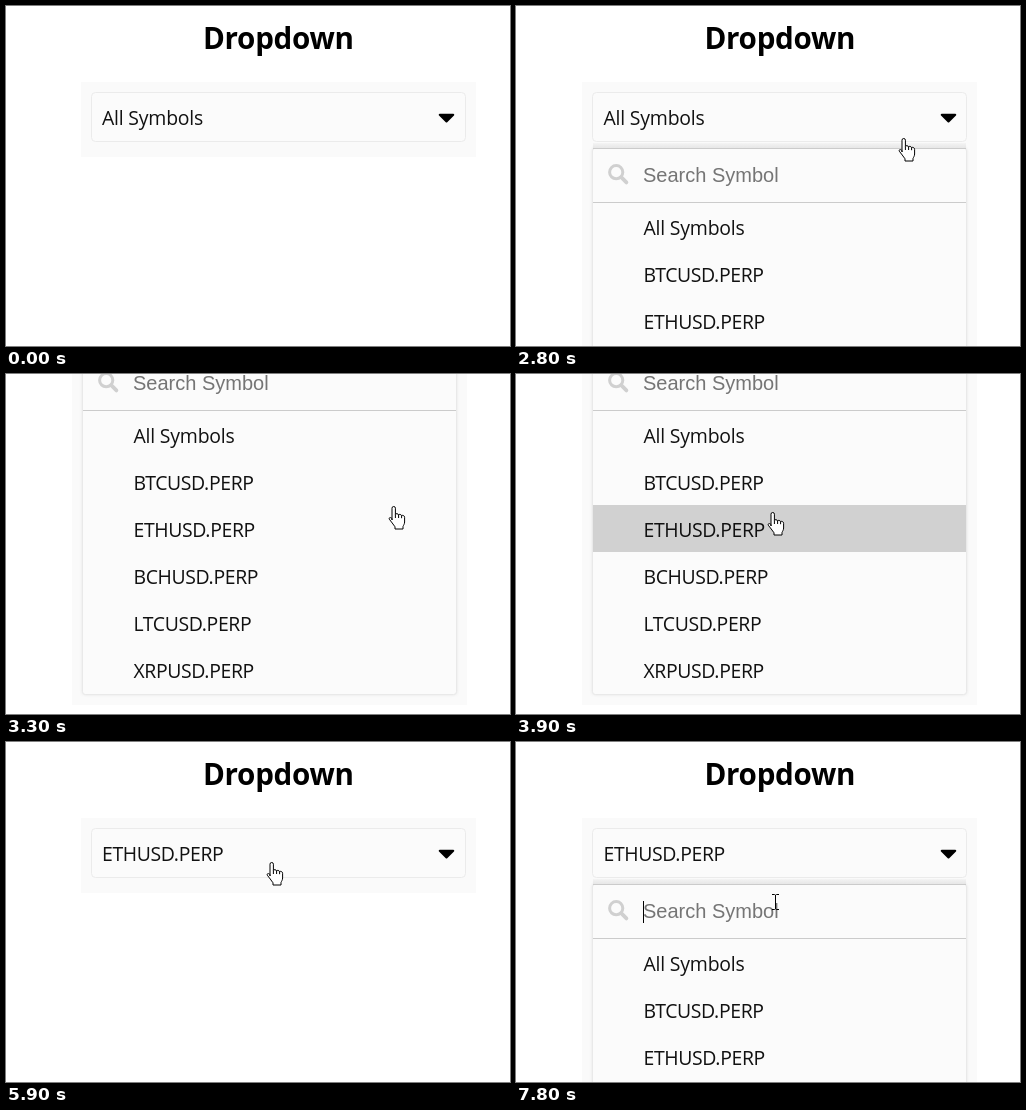
Write an HTML page that moves like this. It is 504 by 340 pixels and loops after 8 s.

```html
<!DOCTYPE html>
<html lang="en">
<head>
<meta charset="utf-8">
<title>Dropdown</title>
<style>
html, body { margin: 0; width: 100%; height: 100%; overflow: hidden; background: #fff; }
svg { display: block; }
text { font: 19.4px "Open Sans", "Noto Sans", sans-serif; letter-spacing: -.2px; fill: #111; white-space: pre; }
.title { font-size: 29.6px; font-weight: 700; letter-spacing: -.3px; fill: #000; text-anchor: middle; }
.code { letter-spacing: -.35px; }
.hint { font: 20px "Liberation Sans", Arial, sans-serif; letter-spacing: 0; fill: #757575; }
.cursor path { stroke: #000; stroke-width: 1; fill: #fff; stroke-linejoin: round; }
.cursor .line { fill: none; }
</style>
</head>
<body>
<svg width="504" height="340" viewBox="0 0 504 340">
  <defs>
    <linearGradient id="gap" x1="0" y1="0" x2="0" y2="1">
      <stop offset="0" stop-color="#f4f4f4"/>
      <stop offset="1" stop-color="#e6e6e6"/>
    </linearGradient>
    <filter id="soft" x="-5%" y="-5%" width="110%" height="110%">
      <feGaussianBlur stdDeviation="1.5"/>
    </filter>
  </defs>
  <g id="page">
    <g id="boxes">
      <rect id="panel" x="75" y="76" width="395" fill="#fafafa"/>
      <rect x="85.5" y="86.5" width="374" height="49" rx="4" fill="#fbfbfb" stroke="#ebebeb"/>
    </g>
    <g id="words">
      <text class="title" x="272.3" y="43">Dropdown</text>
      <text id="value" x="96" y="119"></text>
    </g>
    <g id="icon">
      <path transform="translate(432.1 97.6) scale(.0525)" d="M31.3 192h257.3c17.8 0 26.7 21.5 14.1 34.1L174.1 354.7c-7.8 7.8-20.5 7.8-28.3 0L17.2 226.1C4.6 213.5 13.5 192 31.3 192z"/>
    </g>
    <g id="popup">
      <rect x="76.5" y="142" width="374" height="338.5" rx="3" fill="#ccc" opacity=".7" filter="url(#soft)"/>
      <rect x="77" y="137" width="373" height="5" fill="url(#gap)"/>
      <rect x="76.5" y="142" width="374" height="338.5" rx="3" fill="#fbfbfb" stroke="#e9e9e9"/>
      <path d="M77 142.5H450M77 196.5H450" stroke="#cbcbcb"/>
      <g fill="none" stroke="#d0d0d0">
        <circle cx="100.2" cy="166.2" r="6.6" stroke-width="3"/>
        <path d="M105.2 171.2L110.4 176.4" stroke-width="3.8" stroke-linecap="round"/>
      </g>
      <text class="hint" x="127" y="176">Search Symbol</text>
      <path id="caret" d="M127.5 159V181" stroke="#000"/>
      <rect id="hover" x="77" y="291" width="373" height="47" fill="#d1d1d1"/>
      <g id="list"></g>
    </g>
  </g>
  <g id="cursor" class="cursor">
    <g id="hand">
      <path d="M-1.5 14V2.2a1.7 1.7 0 0 1 3.4 0V8.5c.3-1.2 3-1.1 3.2 .5c.4-1 2.8-.8 3 .8c.5-.9 3-.5 3 1.5V16c0 2-1 3-1.6 4.5V23H1.5V20.8C0 18-2.5 16-4.2 13.2c-.6-1.6 1-2.4 2.7-.6z"/>
      <path class="line" d="M1.9 8.5V12M5.1 9V12M8.1 9.8V12.2"/>
    </g>
    <path id="arrow" d="M.5 .5V16.8L4.2 13.2 6.6 18.7 8.8 17.7 6.4 12.3H11.8Z"/>
    <path id="beam" class="line" d="M-3.5-7.5H-1L0-6.8 1-7.5H3.5M0-7V7M-3.5 7.5H-1L0 6.8 1 7.5H3.5"/>
  </g>
</svg>
<script>
const LOOP = 8000, STEP = 100;
const $ = id => document.getElementById(id);
const names = ["All Symbols", ...["BTC", "ETH", "BCH", "LTC", "XRP"].map(s => s + "USD.PERP")];

names.forEach((name, i) => {
  const row = document.createElementNS("http://www.w3.org/2000/svg", "text");
  row.setAttribute("x", 127.5);
  row.setAttribute("y", 229 + 47 * i);
  row.setAttribute("class", i ? "code" : "");
  row.textContent = name;
  $("list").append(row);
});

// time, x, y of the pointer's hot spot
const path = [
  [900, 447, 82], [1100, 388, 117], [1300, 388, 117], [1500, 415, 107],
  [2400, 415, 107], [2500, 421, 106], [2800, 388, 132], [3400, 388, 132],
  [3900, 257.5, 138], [4300, 257.5, 138], [4500, 258.5, 139], [4800, 258.5, 139],
  [5300, 266.5, 120], [6100, 266.5, 120], [6500, 248, 156], [6600, 248, 156],
  [7000, 259.5, 160]
];

const clamp = v => Math.min(1, Math.max(0, v));
const smooth = v => v * v * (3 - 2 * v);
const show = (id, on) => $(id).setAttribute("display", on ? "inline" : "none");
const move = (id, x, y) => $(id).setAttribute("transform", `translate(${x} ${y})`);

function pointer(t) {
  let i = 0;
  while (i < path.length - 2 && t >= path[i + 1][0]) i++;
  const [t0, x0, y0] = path[i], [t1, x1, y1] = path[i + 1];
  const k = clamp((t - t0) / (t1 - t0));
  return [x0 + (x1 - x0) * k, y0 + (y1 - y0) * k];
}

function pointerKind(t, y, open) {
  if (t >= 3000 && t < 4100) return "hand";
  if (y >= 86 && y < 136) return "hand";
  return open && y > 142 ? "beam" : "arrow";
}

function draw(t) {
  const open = t >= 2000 && t < 4100 || t >= 6000;
  const picked = t >= 4100;
  const scroll = t < 4100 ? Math.round(160 * smooth(clamp((t - 2900) / 400))) : 0;

  move("page", 0, -scroll);
  move("boxes", open ? -9 : 0, 0);
  move("words", open ? -8.5 : 0, 0);
  move("icon", open ? -8 : 0, 0);
  $("panel").setAttribute("height", open ? 415 : 75);
  $("value").textContent = names[picked ? 2 : 0];
  $("value").setAttribute("class", picked ? "code" : "");
  show("popup", open);
  show("hover", t >= 3500 && t < 4100);
  show("caret", t >= 6800 && Math.floor((t - 6800) / 500) % 2 === 0);

  const [x, y] = pointer(t);
  const kind = pointerKind(t, y, open);
  show("cursor", t >= 900);
  for (const k of ["hand", "arrow", "beam"]) show(k, k === kind);
  const snap = { hand: -.5, arrow: 0, beam: .5 }[kind];
  move("cursor", Math.floor(x) + snap, Math.floor(y));
}

const start = performance.now();
function tick() {
  const t = (performance.now() - start) % LOOP;
  draw(Math.floor(t / STEP) * STEP);
  requestAnimationFrame(tick);
}
tick();
</script>
</body>
</html>
```
